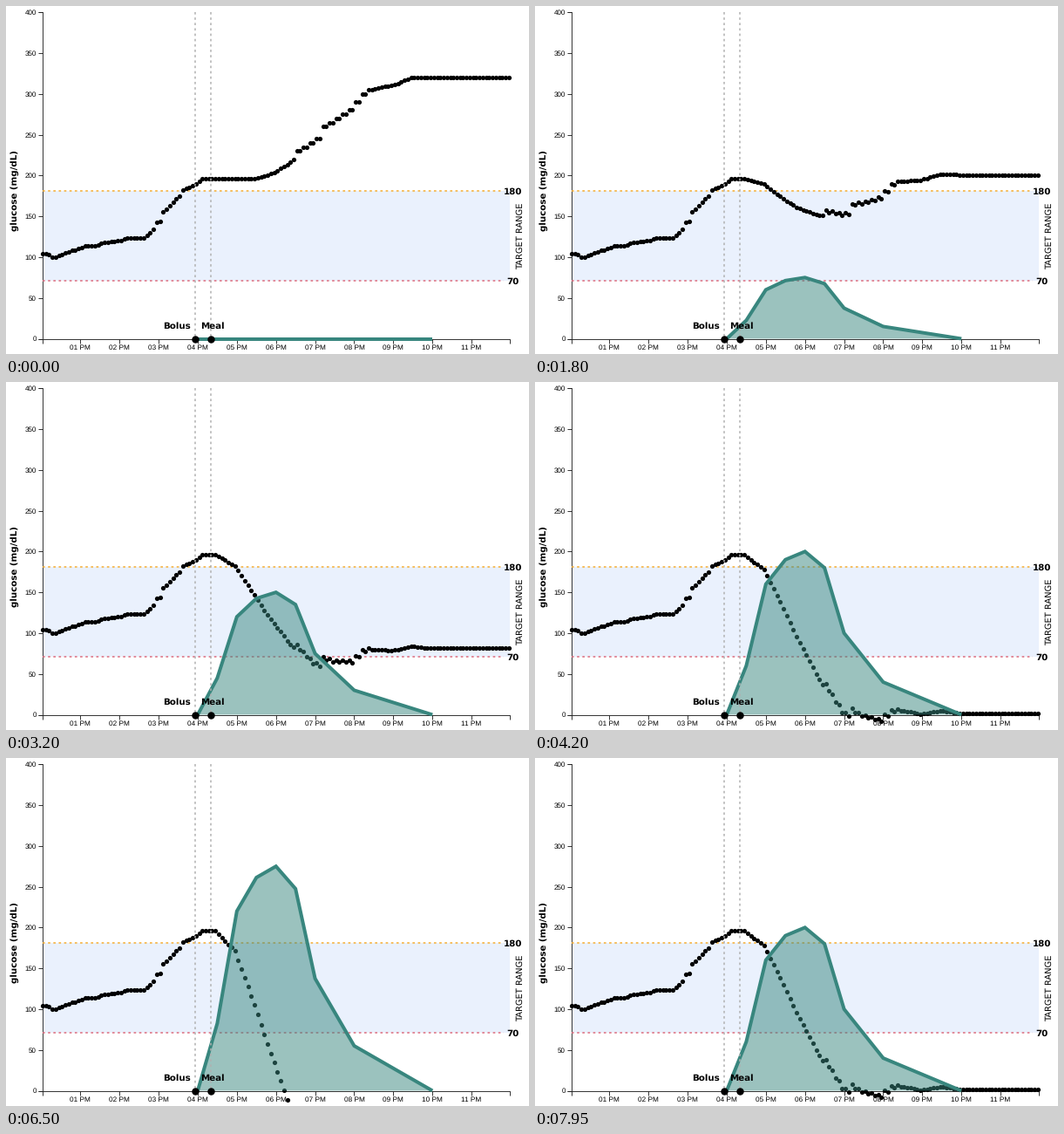
These frames come from a looping animation (600 px wide and 399 px high, 8 s). A matplotlib script:

```python
import numpy as np
import matplotlib.pyplot as plt
from matplotlib.animation import FuncAnimation
from matplotlib.patches import Rectangle

plt.rcParams["text.hinting"] = "no_hinting"

W, H, DPI = 600, 399, 64
PX = 72 / DPI                      # points per pixel
STEP, LOOP = 50, 8000              # ms

LEFT, RIGHT, TOP, BASE = 42, 577.6, 7.2, 381.5
NOON, HOUR = 40.42, 44.88          # pixel of 12 PM, pixels per hour
BOLUS, MEAL = 217, 235

TEAL, ORANGE, RED = "#38867e", "#f5ad31", "#dc6b7d"
BAND, GRAY, AXIS = "#eaf1fd", "#b0b0b0", "#222222"

# Insulin activity: (hour, relative level)
ACTIVITY = [(4, 0), (4.5, .3), (5, .8), (5.5, .95), (6, 1), (6.5, .9),
            (7, .5), (8, .2), (10, 0)]

# Glucose without insulin: (reading number, mg/dL)
GLUCOSE = [(0, 104), (2, 103), (3, 100), (4, 100), (13, 114), (16, 114),
           (19, 118), (24, 120), (26, 123), (31, 123), (34, 134), (35, 143),
           (36, 144), (37, 155), (42, 175), (43, 182), (45, 185), (49, 196),
           (65, 196), (69, 200), (75, 213), (77, 220), (78, 230), (84, 245),
           (86, 260), (94, 280), (98, 300), (100, 305), (107, 310), (113, 320)]
COUNT = 144                        # one reading every five minutes

# Times in ms at which the dose goes one notch up or down
DOSE_STEP = 25
UP = [50, 1050, 1800, 2050, 2450, 2900, 3700, 4050, 4500, 5100, 5750]
DOWN = [6550, 7000, 7500]


def y_px(value):
    return BASE - np.asarray(value) * (BASE - TOP) / 400


def x_px(hour):
    return NOON + HOUR * np.asarray(hour)


def dose_at(now):
    return DOSE_STEP * (sum(t <= now for t in UP) - sum(t <= now for t in DOWN))


# Readings climb in pairs through the evening
index = np.arange(COUNT)
paired = (index >= 78) & (index < 102)
glucose = np.round(np.interp(index - paired * (index % 2), *zip(*GLUCOSE)))

# Activity adds up every half hour and lowers all later readings
act_hours, act_level = np.transpose(ACTIVITY)
total = np.cumsum(np.interp(np.arange(4, 10.1, 0.5), act_hours, act_level))
drop = 0.3 * np.interp(index, 53 + 6 * np.arange(len(total)), total)

fig = plt.figure(figsize=(W / DPI, H / DPI), dpi=DPI, facecolor="white")
ax = fig.add_axes([0, 0, 1, 1])
ax.set(xlim=(0, W), ylim=(H, 0))
ax.axis("off")


def line(xs, ys, color, width, z, **kw):
    return ax.plot(xs, ys, color=color, lw=width * PX, zorder=z,
                   solid_capstyle="butt", dash_capstyle="butt", **kw)[0]


def dashed(xs, ys, color, z):
    line(xs, ys, color, 1.5, z, linestyle=(0, (1.8, 2.3)))


def axis_line(xs, ys):
    line(xs, ys, AXIS, 0.9, 1)


def circles(xs, ys, size, z):
    return ax.plot(xs, ys, "o", color="black", ms=size * PX, mew=0, zorder=z,
                   snap=False)[0]


def text(x, y, s, size, font="DejaVu Sans", **kw):
    opts = dict(ha="center", va="baseline", color="black", zorder=8)
    opts.update(kw)
    ax.text(x, y, s, fontsize=size * PX, family=font, **opts)


# Target range
ax.add_patch(Rectangle((LEFT, 212), RIGHT - LEFT, 103, fc=BAND, lw=0, zorder=0))
for y, label, color in [(212, "180", ORANGE), (314.8, "70", RED)]:
    dashed([LEFT, 571], [y, y], color, 2)
    text(581.2, y + 3.8, label, 10.2, weight="bold")
text(590.3, 263.5, "TARGET RANGE", 9.9, rotation=90, va="center")

# Axes
axis_line([LEFT - 5, LEFT, LEFT, LEFT - 5], [TOP, TOP, BASE, BASE])
axis_line([LEFT, LEFT, RIGHT, RIGHT], [BASE + 5, BASE, BASE, BASE + 5])
for v in range(0, 401, 50):
    y = float(y_px(v))
    axis_line([LEFT - 5, LEFT], [y, y])
    text(35, y + 2.9, str(v), 8, "Liberation Sans", ha="right", zorder=1)
for h in range(1, 12):
    x = float(x_px(h))
    axis_line([x, x], [BASE, BASE + 5])
    text(x, 394.4, f"{h:02d} PM", 8.2, "Liberation Sans", zorder=1)
text(10, 212, "glucose (mg/dL)", 10.2, weight="bold", rotation=90, va="center")

# Readings and insulin curve
dots = circles(LEFT + index * HOUR / 12, y_px(glucose), 5.2, 3)
act_x = x_px(act_hours)
flat = np.full(len(act_x), BASE)
area, = ax.fill(act_x, flat, fc=TEAL, alpha=0.5, lw=0, zorder=4)
curve = line(act_x, flat, TEAL, 4, 5, solid_joinstyle="miter")

# Events
for x, label, label_x in [(BOLUS, "Bolus", 196), (MEAL, "Meal", 236.8)]:
    dashed([x, x], [TOP, BASE], GRAY, 6)
    circles([x], [BASE], 8.4, 7)
    text(label_x, 370, label, 10.3, weight="bold")


def update(frame):
    dose = dose_at(frame * STEP)
    act_y = y_px(dose * act_level)
    dots.set_ydata(y_px(glucose - dose * drop))
    curve.set_ydata(act_y)
    area.set_xy(np.column_stack([act_x, act_y]))
    return dots, curve, area


anim = FuncAnimation(fig, update, frames=LOOP // STEP, interval=STEP,
                     repeat=True, repeat_delay=0, cache_frame_data=False)
plt.show()
```
